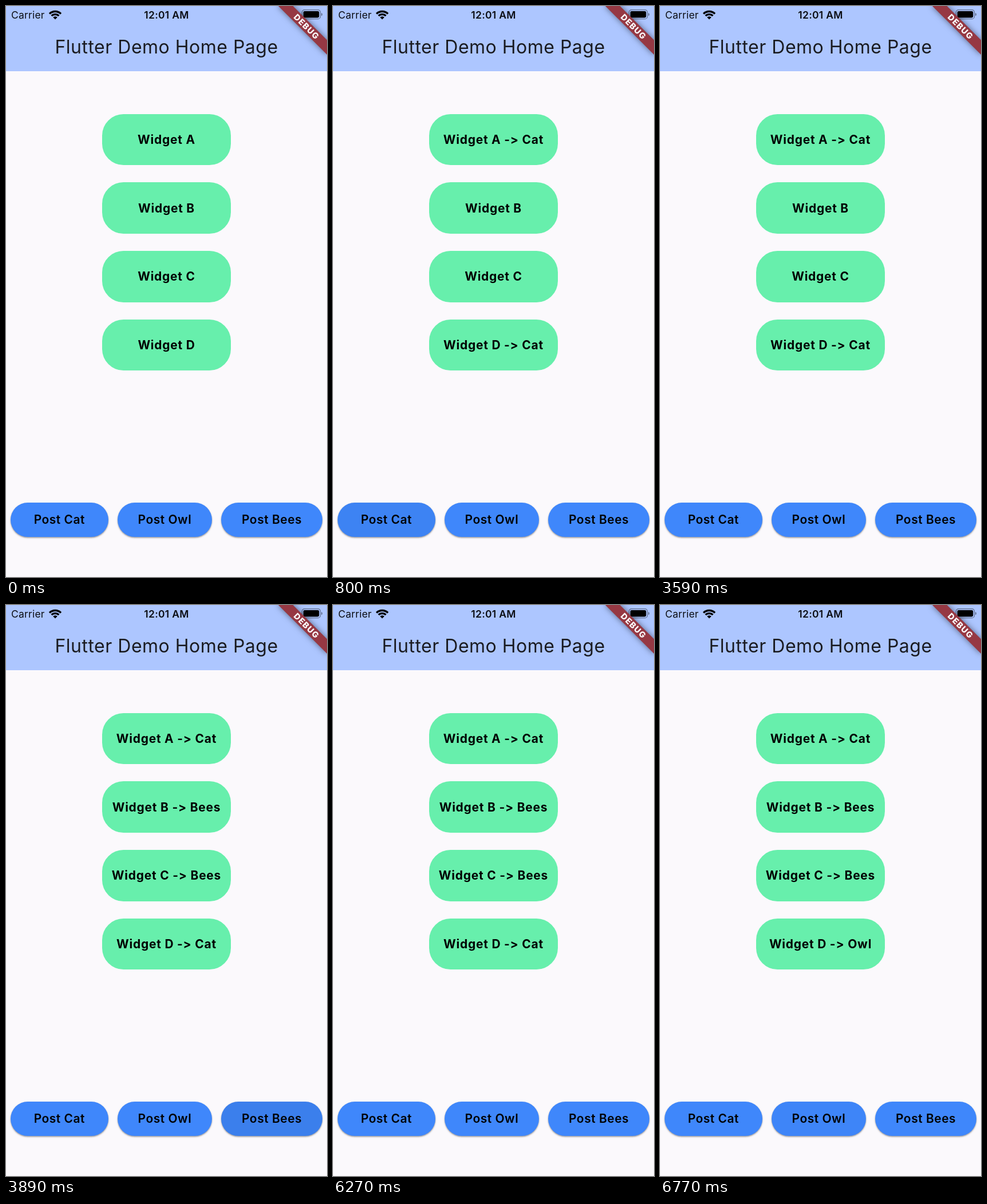
An HTML page for the animation above (8000 ms loop, 561x998 px).

```html
<!DOCTYPE html>
<html lang="en">
<head>
<meta charset="utf-8">
<title>Flutter Demo Home Page</title>
<style>
  html, body { margin: 0; width: 100%; height: 100%; overflow: hidden; }
  body { background: #fbf9fc; font-family: Inter, "Liberation Sans", sans-serif; font-optical-sizing: none; }
  #stage { position: relative; width: 561px; height: 998px; overflow: hidden; }
  #stage > * { position: absolute; white-space: nowrap; }
  .bar { left: 0; top: 0; width: 561px; height: 113.5px; background: #adc6ff; }
  .title { left: 0; width: 561px; top: 52px; line-height: 40px; text-align: center;
    font-size: 32px; letter-spacing: .5px; color: #1a1b20; }
  .status { top: 5px; line-height: 21px; font-size: 17.5px; letter-spacing: .2px; color: #0b0d12; }
  .clock { left: 0; width: 561px; text-align: center; font-weight: 600; letter-spacing: .3px; }
  .card, .button { display: flex; align-items: center; justify-content: center; color: #000;
    font-size: 20.9px; }
  .card { left: 168.3px; width: 224.4px; height: 89.8px; border-radius: 37.4px;
    background: #67efac; font-weight: 700; letter-spacing: .8px; }
  .button { top: 867.8px; height: 59.8px; border-radius: 30px; overflow: hidden;
    background: #3f87fb; font-weight: 600; letter-spacing: .55px;
    box-shadow: 0 1.5px 3px rgba(0,0,0,.3), 0 1.5px 1.5px rgba(0,0,0,.12); }
  .button i { position: absolute; left: 50%; top: 50%; width: 200px; height: 200px;
    margin: -100px; border-radius: 50%; background: #000; opacity: 0; }
  .button span { position: relative; }
  .banner { left: 501.2px; top: 41.9px; width: 119.7px; height: 18px; line-height: 18px;
    transform-origin: 59.8px -41.9px; transform: rotate(45deg); background: #963843;
    box-shadow: 0 0 11px rgba(0,0,0,.5); color: #fff; text-align: center; text-indent: 1px;
    font-size: 14.4px; font-weight: 800; letter-spacing: 1.2px; }
</style>
</head>
<body>
<div id="stage">
  <div class="bar"></div>
  <div class="title">Flutter Demo Home Page</div>
  <div class="status" style="left:9px">Carrier</div>
  <div class="status clock">12:01 AM</div>
  <svg width="561" height="32" style="left:0;top:0">
    <g fill="none" stroke="#000" stroke-width="3.3">
      <path d="M76 13.6A14.2 14.2 0 0 1 96 13.6"/>
      <path d="M79.6 17.2A9.1 9.1 0 0 1 92.4 17.2"/>
    </g>
    <path d="M86 23.6L82.2 19.8A5.4 5.4 0 0 1 89.8 19.8Z"/>
    <rect x="517.4" y="6.8" width="32" height="15.8" rx="4.2" fill="none" stroke="#000" stroke-opacity=".4" stroke-width="1.4"/>
    <rect x="519.6" y="9" width="27.6" height="11.4" rx="2.4"/>
    <path d="M551 12a3 3 0 0 1 0 5.6Z" fill-opacity=".45"/>
  </svg>
  <div class="banner">DEBUG</div>
</div>
<script>
const LOOP = 8000, STEP = 100;
const stage = document.getElementById('stage');

function add(cls, style) {
  const el = document.createElement('div');
  el.className = cls;
  Object.assign(el.style, style);
  return stage.appendChild(el);
}

const cards = [...'ABCD'].map((name, i) => ({
  name, el: add('card', { top: 188.6 + i * 119.7 + 'px' })
}));

const buttons = {};
for (const [word, left, width] of [['Cat', 7.8, 171.1], ['Owl', 194.5, 165.8], ['Bees', 375.9, 177.3]]) {
  const el = add('button', { left: left + 'px', width: width + 'px' });
  el.innerHTML = `<i></i><span>Post ${word}</span>`;
  buttons[word] = el.firstChild;
}

// Each tap posts a word to the cards that listen for it.
const taps = [
  { at: 500, word: 'Cat', to: 'AD' },
  { at: 3690, word: 'Bees', to: 'BC' },
  { at: 6370, word: 'Owl', to: 'D' }
];
const rippleAlpha = [0, .05, .06, .03, .01];

function draw(t) {
  for (const { name, el } of cards) {
    const tap = taps.filter(p => p.at <= t && p.to.includes(name)).pop();
    const text = `Widget ${name}` + (tap ? ` -> ${tap.word}` : '');
    if (el.textContent !== text) el.textContent = text;
  }
  for (const { at, word } of taps) {
    const n = Math.floor((t - at) / STEP);
    const ripple = buttons[word];
    ripple.style.opacity = rippleAlpha[n] || 0;
    ripple.style.transform = `scale(${Math.max(0, Math.min(1, n / 2))})`;
  }
}

const start = performance.now();
function tick() {
  draw((performance.now() - start) % LOOP);
  requestAnimationFrame(tick);
}
tick();
</script>
</body>
</html>
```
